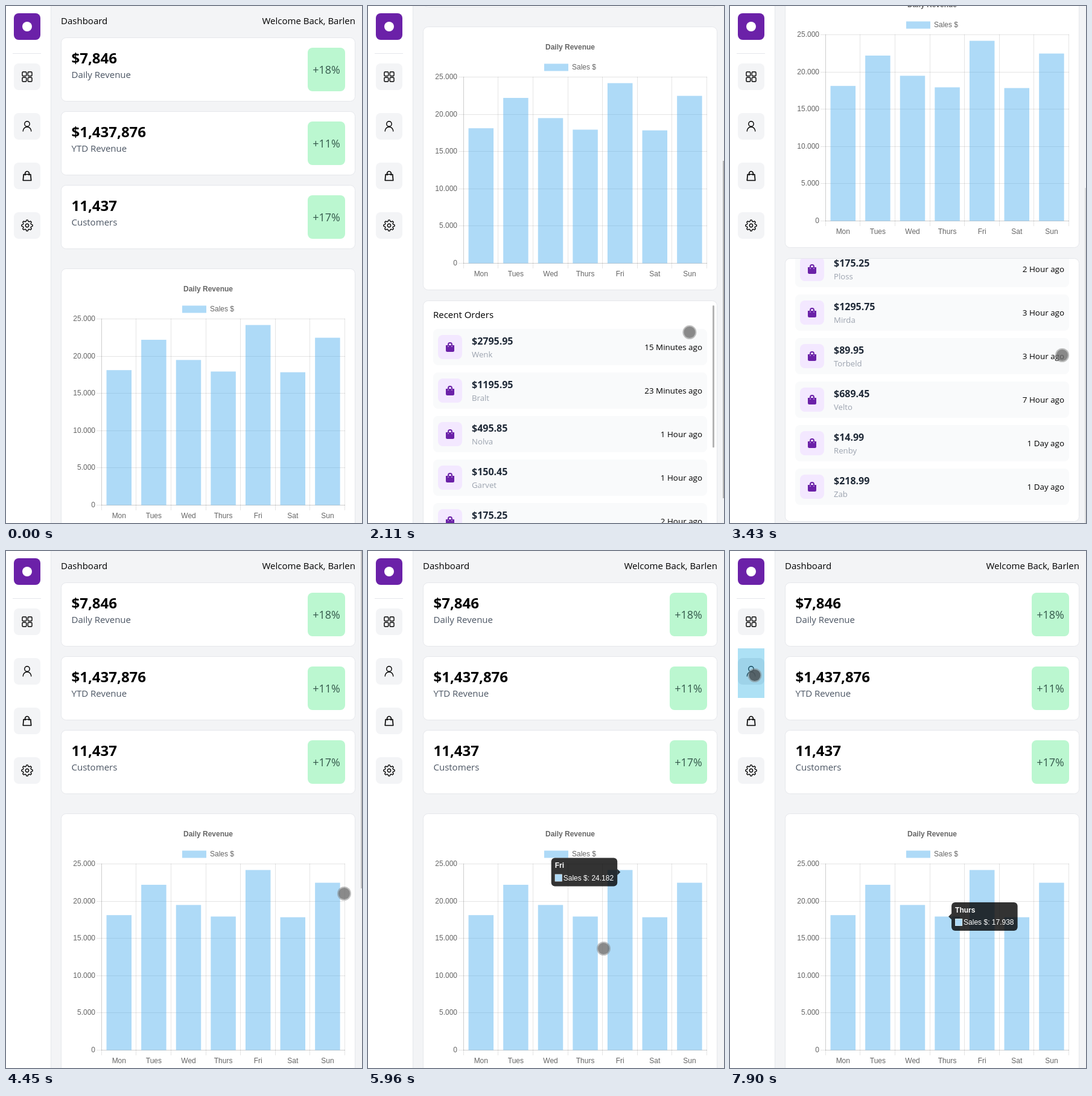
Animation, 590 px wide and 855 px high, one loop 8 s. Source, as an HTML page:

```html
<!DOCTYPE html>
<html lang="en">
<head>
<meta charset="utf-8">
<title>Dashboard</title>
<style>
  html, body { margin: 0; width: 100%; height: 100%; overflow: hidden; background: #f3f4f6; }
  svg { display: block; width: 590px; height: 855px; }
  text { font: 15px "Open Sans", "Noto Sans", sans-serif; white-space: pre; }
  .total { font-size: 24px; font-weight: 700; }
  .sub { fill: #4b5563; }
  .badge { font-size: 18px; fill: #35594c; }
  .amount { font-size: 16px; font-weight: 700; fill: #1f2937; }
  .name { font-size: 13.2px; fill: #9ca3af; }
  .ago { font-size: 13.4px; }
  .chart, .title, .tip, .tipTitle { font: 12px "Liberation Sans", Arial, sans-serif; fill: #666; }
  .title, .tipTitle { font-weight: 700; }
  .tip, .tipTitle { fill: #fff; }
  .icon { fill: none; stroke: #000; stroke-width: 1.4; stroke-linejoin: round; }
</style>
</head>
<body>
<svg id="stage" viewBox="0 0 590 855"></svg>
<script>
const LOOP = 8000, PURPLE = '#6b21a8', BLUE = 'rgba(53,162,235,.4)', BORDER = '#e5e7eb';
const days = ['Mon', 'Tues', 'Wed', 'Thurs', 'Fri', 'Sat', 'Sun'];
const sales = [18127, 22201, 19490, 17938, 24182, 17842, 22475];
const totals = [
  ['$7,846', 'Daily Revenue', '+18%'],
  ['$1,437,876', 'YTD Revenue', '+11%'],
  ['11,437', 'Customers', '+17%'],
];
const orders = [
  ['$2795.95', 'Wenk', '15 Minutes'], ['$1195.95', 'Bralt', '23 Minutes'],
  ['$495.85', 'Nolva', '1 Hour'], ['$150.45', 'Garvet', '1 Hour'],
  ['$175.25', 'Ploss', '2 Hour'], ['$1295.75', 'Mirda', '3 Hour'],
  ['$89.95', 'Torbeld', '3 Hour'], ['$689.45', 'Velto', '7 Hour'],
  ['$14.99', 'Renby', '1 Day'], ['$218.99', 'Zab', '1 Day'],
];

const rect = (x, y, w, h, fill, r = 0, more = '') =>
  `<rect x="${x}" y="${y}" width="${w}" height="${h}" rx="${r}" fill="${fill}" ${more}/>`;
const circle = (x, y, r, more = '') => `<circle cx="${x}" cy="${y}" r="${r}" ${more}/>`;
const text = (x, y, cls, str, anchor = 'start') =>
  `<text x="${x}" y="${y}" class="${cls}" text-anchor="${anchor}">${str}</text>`;
const path = (d, more = '') => `<path d="${d}" ${more}/>`;
const group = (x, y, body) => `<g transform="translate(${x} ${y})">${body}</g>`;
const card = (y, h) => rect(91.5, y + .5, 487, h - 1, '#fff', 8, `stroke="${BORDER}"`);

// Chart geometry
const barX = i => 187.3 + 57.6 * i;
const valueY = v => 825.5 - v * 308 / 25000;
const crisp = n => Math.floor(n) + .5;

function chart() {
  const lines = ['M158.5 517V826', 'M158 825.5H562'];
  let out = '';
  for (let i = 0; i < 8; i++) lines.push(`M${crisp(158.3 + 57.6 * i)} 517V834`);
  for (let i = 0; i < 6; i++) {
    const y = crisp(valueY(5000 * i));
    lines.push(`M150 ${y}H562`);
    out += text(148, y + 3.5, 'chart', i ? 5 * i + '.000' : '0', 'end');
  }
  out += lines.map(d => path(d, 'stroke="rgba(0,0,0,.1)"')).join('');
  days.forEach((day, i) => {
    const y = valueY(sales[i]);
    out += rect(barX(i) - 20.75, y, 41.5, 825.5 - y, BLUE) + text(barX(i), 847, 'chart', day, 'middle');
  });
  return card(434, 436) + text(335, 472, 'title', 'Daily Revenue', 'middle') +
    rect(292, 495.5, 40, 12, BLUE) + text(338, 505, 'chart', 'Sales $') + out;
}

const totalCard = ([sum, label, change], i) => group(0, 52 + 122 * i,
  card(0, 106) + text(108.5, 43, 'total', sum) + text(108.5, 67, 'sub', label) +
  rect(500, 17, 62, 72, '#bbf7d0', 8) + text(531, 60, 'badge', change, 'middle'));

const bag = path('M0 5h14v8.5a2.5 2.5 0 0 1-2.5 2.5h-9A2.5 2.5 0 0 1 0 13.5z', `fill="${PURPLE}"`) +
  path('M4 6V4a3 3 0 0 1 6 0v2', `fill="none" stroke="${PURPLE}" stroke-width="2"`) +
  circle(4, 7, .75, 'fill="#f3e8ff"') + circle(10, 7, .75, 'fill="#f3e8ff"');

const orderRow = ([sum, name, ago], i) => group(0, 940 + 72 * i,
  rect(108, 0, 454, 60, '#f9fafb', 8) + rect(116, 10, 40, 40, '#f3e8ff', 8) + group(129, 22, bag) +
  text(172, 26, 'amount', sum) + text(172, 47, 'name', name) + text(554, 35, 'ago', ago + ' ago', 'end'));

function gear() {
  const points = [];
  for (let i = 0; i < 96; i++) {
    const a = i * Math.PI / 48;
    const r = 8 + Math.max(-1.1, Math.min(1.1, 1.9 * Math.cos(8 * a)));
    points.push(`${(r * Math.cos(a)).toFixed(2)} ${(r * Math.sin(a)).toFixed(2)}`);
  }
  return path(`M${points.join('L')}Z`) + circle(0, 0, 2.7);
}

function sidebar() {
  const tiles = [0, 1, 2, 3].map(i => rect(13, 95 + 82 * i, 44, 44, '#f3f4f6', 8, `id="tile${i}"`)).join('');
  const squares = [0, 1, 2, 3].map(i =>
    rect(27 + 9.3 * (i % 2), 109 + 9.3 * (i >> 1), 6.7, 6.7, 'none', 1.2)).join('');
  return rect(0, 0, 74, 855, '#fff') + rect(74, 0, 1, 855, BORDER) +
    rect(13, 12, 44, 44, PURPLE, 8) + circle(35, 34, 8, 'fill="#fff"') +
    rect(11, 78, 47, 1, BORDER) + tiles + '<g class="icon">' + squares +
    circle(35, 195, 4.2) + path('M28.2 207.5C28.2 203 31.2 200 35 200s6.8 3 6.8 7.5') +
    group(25, 271, path('M16 11V7a4 4 0 0 0-8 0v4M5 9h14l1 12H4z', 'transform="scale(.833)" stroke-width="2"')) +
    group(35, 363, gear()) + '</g>' +
    rect(13, 161, 44, 82, 'rgba(51,181,229,.4)', 0, 'id="tap"');
}

stage.innerHTML = `<clipPath id="listClip">${rect(92, 888, 486, 434, '#000', 8)}</clipPath>
  <g id="page">
    ${text(91, 30, '', 'Dashboard') + text(579, 30, '', 'Welcome Back, Barlen', 'end')}
    ${totals.map(totalCard).join('') + chart() + card(887, 436)}
    <g clip-path="url(#listClip)"><g id="list">
      ${text(108, 921.5, '', 'Recent Orders') + orders.map(orderRow).join('')}
    </g></g>
    ${rect(571, 892, 3, 235, '#b4b4b4', 1, 'id="listBar"')}
    <g id="tooltip"></g>
  </g>
  ${sidebar() + rect(588, 0, 2, 558, '#b4b4b4', 0, 'id="pageBar"')}
  <g id="cursor">${circle(0, 0, 11.5, 'fill="rgba(128,128,128,.5)"') + circle(0, 0, 9.5, 'id="dot"')}</g>`;
const el = id => document.getElementById(id);
const clamp = p => Math.max(0, Math.min(1, p));

function ease(t, start, end) {
  const p = clamp((t - start) / (end - start));
  return p * p * (3 - 2 * p);
}

const pageScroll = t => 400 * ease(t, 1110, 1777) + 70 * ease(t, 2850, 3030) - 470 * ease(t, 3990, 4410);
const listScroll = t => 353 * (ease(t, 2045, 2890) - ease(t, 3690, 4010));

// Overlay scrollbars show at once and fade after the last scroll
const shown = (t, start, end) => t < start ? 0 : clamp(1 - (t - end) / 650);

// Each leg of the pointer: start, end, x, y
const legs = [[340, 900, 531.5, 536.5], [1850, 3410, 550.5, 577.5], [3710, 4410, 560.5, 566.5],
  [4510, 5330, 480.5, 654.5], [5400, 5910, 390.5, 657.5], [5910, 6210, 360, 679.5],
  [6210, 7110, 35, 137], [7110, 7710, 41, 205.5]];

function pointer(t) {
  let x = 606, y = 815;
  for (const [start, end, toX, toY] of legs) {
    const p = ease(t, start, end);
    x += (toX - x) * p;
    y += (toY - y) * p;
  }
  return [x, y];
}

// Saturday, Friday, then Thursday gets tapped
const tapTimes = [5160, 5693, 6250];
const TIP_W = 109.5, TIP_H = 47;
const tipSpot = i => [i > 3 ? barX(i) - 7 - TIP_W : barX(i) + 7, valueY(sales[i]) - TIP_H / 2];

function tooltip(t) {
  const n = tapTimes.filter(start => start <= t).length - 1;
  if (n < 0) return '';
  const i = 5 - n, age = t - tapTimes[n], from = tipSpot(n ? i + 1 : i);
  const rest = (1 - clamp(age / 400)) ** 4;
  const [x, y] = tipSpot(i).map((v, k) => v + (from[k] - v) * rest);
  const caret = i > 3 ? `M${TIP_W} 18.5l5 5-5 5z` : 'M0 18.5l-5 5 5 5z';
  return `<g opacity="${n ? 1 : clamp(age / 200)}">` + group(x, y,
    `<g fill="rgba(0,0,0,.8)"><rect width="${TIP_W}" height="${TIP_H}" rx="6"/>${path(caret)}</g>` +
    text(6, 17, 'tipTitle', days[i]) + rect(6, 27, 12, 12, '#fff') + rect(6.5, 27.5, 11, 11, BLUE) +
    text(20, 37.2, 'tip', 'Sales $: ' + (sales[i] / 1000).toFixed(3))) + '</g>';
}

const move = (id, x, y) => el(id).setAttribute('transform', `translate(${x} ${y})`);

function draw() {
  // The picture refreshes ten times a second
  const t = Math.floor((performance.now() % LOOP - 10) / 100) * 100 + 10;
  const page = pageScroll(t), list = listScroll(t), pressed = t >= 7710;
  move('page', 0, -Math.round(page));
  move('list', 0, -Math.round(list));
  move('pageBar', 0, page * .64);
  move('listBar', 0, list * .553);
  move('cursor', ...pointer(t));
  el('pageBar').style.opacity = t < 3700 ? shown(t, 1200, 3030) : shown(t, 3700, 4250);
  el('listBar').style.opacity = t < 3700 ? shown(t, 1200, 2750) : shown(t, 3700, 4010);
  el('tap').style.opacity = +pressed;
  el('tile1').style.fill = pressed ? '#e5e7eb' : '#f3f4f6';
  el('dot').style.fill = pressed ? 'rgba(70,80,85,.8)' : 'rgba(100,100,100,.58)';
  el('tooltip').innerHTML = tooltip(t);
  requestAnimationFrame(draw);
}
draw();
</script>
</body>
</html>
```
